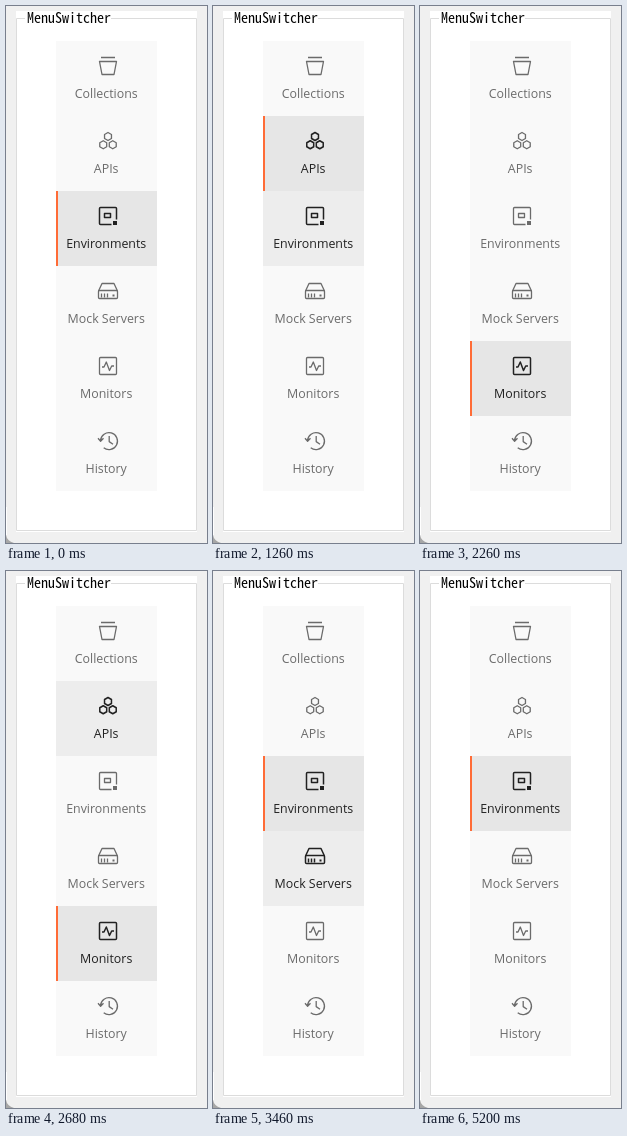
An HTML page that plays this animation: 201x537 px, repeating every 5.28 s.

```html
<!DOCTYPE html>
<html lang="en">
<head>
<meta charset="utf-8">
<title>MenuSwitcher</title>
<style>
  html, body { margin: 0; width: 100%; height: 100%; overflow: hidden; background: #f0f0f0; }
  svg { display: block; width: 201px; height: 537px; }
  .frame { fill: none; stroke: #dcdcdc; }
  .title { font: 14px "Noto Sans Mono CJK SC", "Noto Sans Mono CJK JP", "Liberation Serif", serif; }
  .item { color: #6b6b6b; }
  .item text { font: 12.4px "Open Sans", "Noto Sans", sans-serif; text-anchor: middle; fill: currentColor; }
  .icon { fill: none; stroke: currentColor; stroke-width: 1.3; stroke-linejoin: round; }
  .icon .solid { fill: currentColor; stroke: none; }
  .back { fill: #f9f9f9; }
  .bar { fill: #ff6c37; visibility: hidden; }
  .hover, .selected { color: #212121; }
  .hover .icon, .selected .icon { stroke-width: 1.5; }
  .hover .back { fill: #ededed; }
  .selected .back { fill: #e6e6e6; }
  .selected .bar { visibility: visible; }
</style>
</head>
<body>
<svg viewBox="0 0 201 537">
  <rect width="201" height="537" fill="#f0f0f0"/>
  <rect y="501" width="1" height="28" fill="#fff"/>
  <path d="M0 529Q1 535 8 537H0z" fill="#a6a6a6"/>
  <rect x="10" y="5" width="181" height="521" fill="#fff"/>
  <path class="frame" d="M19 12.5H10.5V524.5H190.5V12.5H105"/>
  <text class="title" x="21" y="17">MenuSwitcher</text>
  <g id="menu"></g>
</svg>
<script>
const ROW = 75, LOOP = 5280;

const path = d => `<path d="${d}"/>`;
// Box centred on (cx, cy).
const box = (size, cx = 0, cy = 0, height = size, attrs = '') =>
  `<rect x="${cx - size / 2}" y="${cy - height / 2}" width="${size}" height="${height}" ${attrs}/>`;
const frame = box(17, 0, 0, 17, 'rx="1"');

const around = (count, radius, turn, cx = 0, cy = 0) =>
  Array.from({ length: count }, (_, i) => {
    const angle = 2 * Math.PI * (i / count + turn);
    return [cx + radius * Math.cos(angle), cy + radius * Math.sin(angle)];
  });
const hexagon = ([cx, cy]) => `<polygon points="${around(6, 4, 1 / 12, cx, cy).join(' ')}"/>`;

const icons = {
  'Collections': path('M-7-8.5H7M-8.5-4.5H8.5L6 8.5H-6z'),
  'APIs': around(3, 5.5, -1 / 4, 0, 1).map(hexagon).join(''),
  'Environments': path('M3.5 8.5H-7.5a1 1 0 0 1-1-1V-7.5a1 1 0 0 1 1-1H7.5a1 1 0 0 1 1 1V3.5')
    + box(6, -.5, -.5, 4) + box(4, 7, 7, 4, 'class="solid"'),
  'Mock Servers': box(19, 0, 3.5, 8, 'rx="1"') + path('M-9.5 0L-6-7.5H6L9.5 0')
    + [-6.5, -3.5, -.5].map(x => path(`M${x} 2.5v4`)).join('')
    + box(2, 5.5, 4.5, 2, 'class="solid"'),
  'Monitors': frame + path('M-6 1h2l2.3-5 3.2 8.5L3.7 0H6'),
  'History': path('M-7.5-.5A8.5 8.5 0 1 1-4.3 6.8M-10-2.8l2.6 3 2.9-3M1.2-5V.6L5 3.2')
};

const menu = document.getElementById('menu');
menu.innerHTML = Object.entries(icons).map(([label, icon], i) => `
  <g class="item" transform="translate(50 ${35 + i * ROW})">
    <rect class="back" width="101" height="${ROW}"/>
    <rect class="bar" width="2" height="${ROW}"/>
    <g class="icon" transform="translate(52 25)">${icon}</g>
    <text x="50.2" y="57">${label}</text>
  </g>`).join('');
const rows = [...menu.children];

// The pointer enters a row at each move; a click selects the row under it.
const OUTSIDE = -1, FIRST_SELECTED = 2;
const moves = [
  [520, 0], [920, 1], [1260, 2], [1640, 3], [2160, 4],
  ...[3, 2, 1].map((row, i) => [2520 + 80 * i, row]),
  [3040, 2], [3460, 3], [4120, 2], [4460, OUTSIDE]
];
const clicks = [660, 1060, 1460, 2040, 2260, 2720, 3340, 3820, 4320];

const rowAt = time => moves.findLast(([start]) => start <= time)?.[1] ?? OUTSIDE;

function draw(time) {
  const click = clicks.findLast(start => start <= time);
  const selected = click === undefined ? FIRST_SELECTED : rowAt(click);
  const hovered = rowAt(time);
  rows.forEach((row, i) => {
    row.classList.toggle('selected', i === selected);
    row.classList.toggle('hover', i === hovered);
  });
}

const begin = performance.now();
function tick() {
  draw((performance.now() - begin) % LOOP);
  requestAnimationFrame(tick);
}
tick();
</script>
</body>
</html>
```
